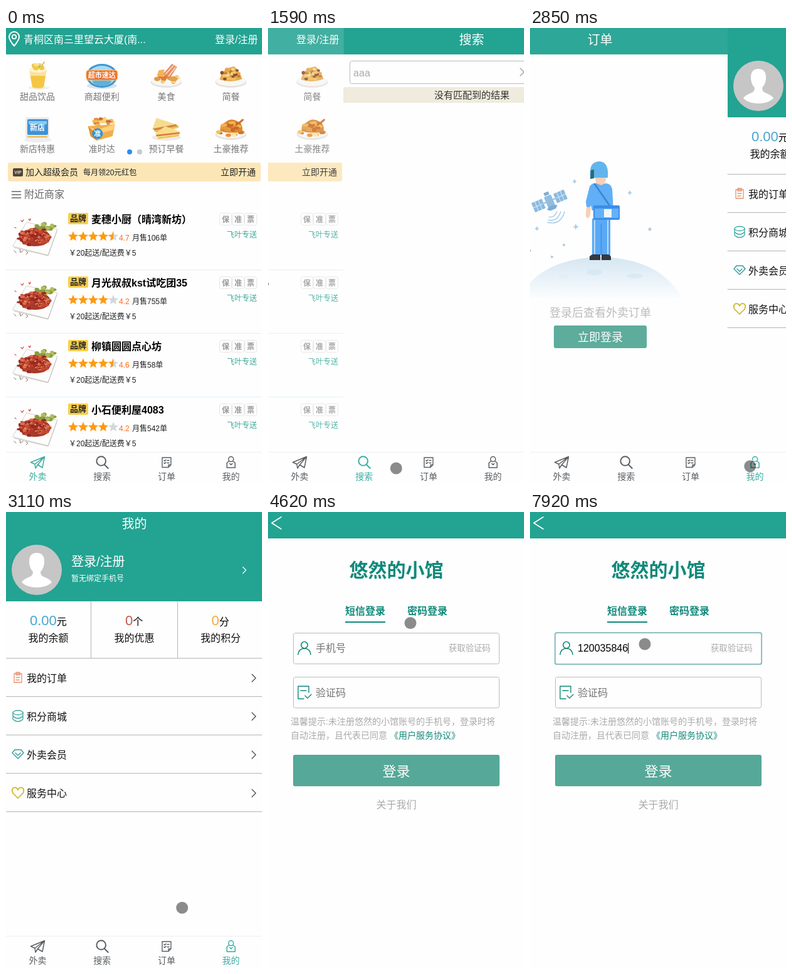
Animation of 408 by 725 pixels, one loop 8 s. Source, as an HTML page:

```html
<!DOCTYPE html>
<html lang="zh-CN">
<head>
<meta charset="utf-8">
<style>
html, body { margin: 0; width: 100%; height: 100%; overflow: hidden; background: #fefefe; }
svg { display: block; width: 408px; height: 725px; overflow: hidden; }
text { font-family: 'Liberation Sans', 'Noto Sans CJK SC', 'Noto Sans CJK', sans-serif; white-space: pre; }
.b { font-weight: bold; }
.m { text-anchor: middle; }
</style>
</head>
<body>
<svg id="stage" viewBox="0 0 408 725"></svg>
<script>
const W = 408, LOOP = 8000;
const TEAL = '#23a392', SOFT = '#56a898', DEEP = '#11897a', PAPER = '#fefefe';

// Shape helpers; text is placed by its vertical centre.
const text = (x, cy, size, str, fill, cls = '') =>
  `<text x="${x}" y="${cy + size * .38}" font-size="${size}" fill="${fill}" class="${cls}">${str}</text>`;
const rect = (x, y, w, h, fill, r = 0, more = '') =>
  `<rect x="${x}" y="${y}" width="${w}" height="${h}" fill="${fill}" rx="${r}" ${more}/>`;
const oval = (x, y, rx, ry, fill, more = '') =>
  `<ellipse cx="${x}" cy="${y}" rx="${rx}" ry="${ry}" fill="${fill}" ${more}/>`;
const path = (d, fill, stroke = 'none', w = 1) =>
  `<path d="${d}" fill="${fill}" stroke="${stroke}" stroke-width="${w}" stroke-linecap="round" stroke-linejoin="round"/>`;
const line = (d, stroke, w = 1) => path(d, 'none', stroke, w);
const frame = (x, y, w, h, stroke, r) => rect(x, y, w, h, 'none', r, `stroke="${stroke}"`);
const at = (x, y, body, more = '') => `<g transform="translate(${x} ${y}) ${more}">${body}</g>`;
const chevron = (x, y, color) => line(`M${x - 3} ${y - 6}l6 6-6 6`, color, 1.2);
const header = title => rect(0, 0, W, 42, TEAL) + text(204.5, 18, 20, title, '#fff', 'm');

// Seeded crumbs inside an ellipse.
function crumbs(n, cx, cy, rx, ry, size, colors, seed) {
  const rnd = () => (seed = (seed * 16807) % 2147483647) / 2147483647;
  let out = '';
  for (let i = 0; i < n; i++) {
    const a = rnd() * 6.283, r = Math.sqrt(rnd());
    out += oval((cx + Math.cos(a) * r * rx).toFixed(1), (cy + Math.sin(a) * r * ry).toFixed(1),
      size * (.7 + rnd() * .6), size * (.5 + rnd() * .4), colors[i % colors.length]);
  }
  return out;
}

const plate = oval(0, 10, 25, 9, '#e6e3df') + oval(0, 8, 24, 8, '#f8f7f4');
const foods = [
  oval(2, 19, 17, 3, '#f0efed') + path('M-13-10L15-10 10 19Q1 22-8 19z', '#fae3a0') +
    path('M-11 0L13 0 10 18Q1 21-8 18z', '#f5c645') + oval(1, -10, 14, 5, '#fff3cf') +
    crumbs(10, 2, -14, 10, 4, 4, ['#f6c945', '#fbe08a', '#eec24e', '#a9bd5c'], 9) + line('M6-14L11-22', '#e9b95c', 2),
  oval(0, 16, 24, 5, '#d9e2e8') + oval(0, 0, 25, 19, '#3f97d3') + oval(0, 0, 22, 16, '#a6dcf2') +
    oval(0, 8, 15, 8, '#5fb0df') +
    rect(-25, -9, 50, 16, '#f0702d', 4, 'stroke="#fbd083"') + text(0, -1, 11, '超市速达', '#fff', 'b m'),
  plate + crumbs(24, -1, 4, 19, 8, 4, ['#f3cc74', '#dc9a4a', '#f6e2a8', '#e0793f'], 4) +
    path('M-6-2L9-19 17-14 6 3z', '#e58c60') + line('M-1-3L11-16M4 0L14-13', '#fbe0cc', 1.8) +
    path('M-15 0L-12-9-3-10-5 2z', '#f3b455') + oval(11, 5, 7, 4, '#e5a04b'),
  plate + path('M-18 6Q-15-6-6-12L5-15Q14-8 18 5Q0 12-18 6z', '#e3ab54') +
    crumbs(30, 0, -2, 15, 9, 3.2, ['#e7a549', '#f6d78e', '#8f4f2b', '#f3c05c', '#c47a35'], 16),
  oval(1, 19, 22, 4, '#efeeec') + rect(-19, -17, 38, 34, '#e8ebec', 2) + rect(-16, -14, 33, 25, '#3c93d8', 2) +
    rect(-14, -11, 29, 5, '#8cc8f0') + text(0, -1, 12, '新店', '#fff', 'b m') + line('M-15 14h30', '#f0b24a', 2),
  path('M-22-3L21-6 17 13-8 20-18 13z', '#f2ae4a') + path('M-22-3L-9 3 -8 20-18 13z', '#dd9232') +
    crumbs(22, 0, -9, 18, 6, 3.8, ['#f6d27b', '#e58b3a', '#c9703a', '#f4b450'], 7) +
    path('M-22-3L-9 3 21-6 18 3-8 10z', '#ffd07a') + oval(-7, 9, 8.5, 8.5, '#2f93d9') + text(-7, 9, 11, '准', '#fff', 'b m'),
  oval(0, 15, 23, 5, '#eceae6') + path('M-22 1L-16-16 15-6 20 0-14 8z', '#f7dc8e') + path('M-22 1L15-6 20-2-14 8z', '#cf8744') +
    line('M-18 5L18-2', '#efc04f', 2.5) + path('M-18 9L-2-3 22 6 20 13-12 18z', '#f8dd8b') +
    line('M-15 12L20 8', '#d9773f', 2.5) + line('M-13 16L19 12', '#edbd57', 2),
  plate + crumbs(16, 0, 7, 20, 5, 3.6, ['#f4c25d', '#e7913a', '#fbe5af', '#c97830'], 21) +
    path('M-17 5Q-18-5-9-9Q0-17 10-11Q20-7 18 5Q2 10-17 5z', '#db852f') +
    crumbs(16, 0, -3, 14, 7, 4, ['#f1b250', '#c96a25', '#e59a3e'], 13) + line('M13-8L19-13', '#c9742a', 3)
];
const foodNames = ['甜品饮品', '商超便利', '美食', '简餐', '新店特惠', '准时达', '预订早餐', '土豪推荐'];

const dish = path('M33 26L82 37 67 78 11 64z', '#fdfdfc', '#cbc7c2', .8) + line('M13 66L67 79 81 40', '#c2beb8', 1) +
  crumbs(20, 62, 32, 18, 6, 3.4, ['#8a9c3b', '#b0bd5c', '#6a862f'], 5) +
  oval(46, 50, 25, 14, '#a8382a') +
  crumbs(60, 46, 49, 26, 14, 3.2, ['#c9492f', '#98291f', '#dd6f50', '#b53c2a'], 11) +
  crumbs(30, 46, 48, 23, 12, 1.3, ['#f0a080', '#7a2018', '#e8805c'], 31) +
  line('M24 23l2 2 2-3M36 21l2 2 1-3M14 34l2 1', '#d2503f', 1.3) + line('M13 71l3 3M22 69l1 5 4-3M32 72l3 2-3 3', '#8b6a62', 1);

function star(cx, from, to, fill) {
  const pts = [];
  for (let k = from; k <= to; k++) {
    const a = (k * 36 - 90) * Math.PI / 180, r = k % 2 ? 3.8 : 8.4;
    pts.push((cx + r * Math.cos(a)).toFixed(1) + ',' + (48.5 + r * Math.sin(a)).toFixed(1));
  }
  return `<polygon points="${pts.join(' ')}" fill="${fill}"/>`;
}

function shop([name, score, sold], i) {
  let s = dish + rect(99, 11, 32, 18, '#f9d04b', 2) + text(115, 19.5, 13, '品牌', '#222', 'b m') +
    text(136, 21, 16, name, '#000', 'b');
  for (let k = 0; k < 5; k++) {
    const cx = 107 + 16 * k;
    s += star(cx, 0, 9, k < 4 ? '#ff9a0d' : '#d3d7de');
    if (k == 4 && score > 4.5) s += star(cx, 5, 10, '#ff9a0d');
  }
  s += text(180, 50, 12, score, '#ff6a1a') + text(201, 50, 12, `月售${sold}单`, '#222') +
    text(100, 74, 12, '￥20起送/配送费￥5', '#222');
  [...'保准票'].forEach((c, k) => s += frame(340.5 + 20 * k, 11.5, 19, 19, '#e6e6e6', 3) + text(350 + 20 * k, 21, 12, c, '#999', 'b m'));
  return at(0, 283 + 101 * i, s + text(352, 45, 12, '飞叶专送', '#39a99b') + line('M0 101.5H408', '#e3eff6'));
}

function home() {
  let s = rect(0, 0, W, 42, TEAL) + line('M13 28.5Q5 19 5 14a8 8 0 0 1 16 0Q21 19 13 28.5z', '#fff', 2) +
    oval(13, 14, 3.2, 3.2, 'none', 'stroke="#fff" stroke-width="1.8"') +
    text(28, 17.5, 16, '青桐区南三里望云大厦(南...', '#fff') + text(333, 17.5, 16, '登录/注册', '#fff');
  foods.forEach((f, i) => {
    const x = 50 + 102.8 * (i % 4), y = i < 4 ? 76 : 159;
    s += at(x, y, f) + text(x, y + 33, 14, foodNames[i], '#777', 'm');
  });
  s += oval(197, 197, 4, 4, '#2b8ff0') + oval(213, 197, 4, 4, '#cacaca') +
    rect(3, 214, 403, 30, '#fde6b6', 3) + rect(11, 223, 16, 13, '#4a4540', 2) + text(19, 229, 7, 'VIP', '#f8dfa8', 'b m') +
    text(31, 229, 14, '加入超级会员', '#222') + text(123, 229, 12, '每月领20元红包', '#222') + text(342, 229, 14, '立即开通', '#222') +
    line('M9.5 260H23.5M9.5 265H23.5M9.5 270H23.5', '#666', 1.6) + text(29, 264, 16, '附近商家', '#666');
  const shops = [['麦穗小厨（晴湾新坊）', 4.7, 106], ['月光叔叔kst试吃团35', 4.2, 755], ['柳镇圆圆点心坊', 4.6, 58], ['小石便利屋4083', 4.2, 542]];
  return s + shops.map(shop).join('');
}

const search = () => header('搜索') + frame(10.5, 52.5, 295, 36, '#bbb', 3) + text(16, 71, 16, 'aaa', '#aaa') +
  line('M282 64l12 12m0-12l-12 12', '#aaa', 1.5) + rect(315, 53, 83, 35, TEAL, 3) + text(357, 71, 18, '提交', '#fff', 'm') +
  rect(0, 94, W, 25, '#efebdd') + text(205, 106.5, 15, '没有匹配到的结果', '#333', 'm');

function orders() {
  const panel = x => rect(x, -8, 18, 16, '#86b7df') + line(`M${x + 6}-8v16M${x + 12}-8v16M${x} 0h18`, '#deedf8');
  const sat = at(124, 275, panel(-28) + panel(10) + line('M-10 0H10', '#86b7df', 2) + rect(-6, -9, 12, 20, '#8bbbe0', 2) +
    rect(-4, -15, 8, 5, '#76a9d6') + path('M-9 11Q0 5 9 11L5 15H-5z', '#76a9d6'), 'rotate(-23)') +
    line('M123 300q8 3 13-8M122 305q14 4 20-13M121 309q21 5 27-17', '#9cc5e6', 1.3);
  const sparkles = [[164, 244, 3], [166, 316, 4], [104, 319, 3], [93, 354, 2], [147, 345, 2], [128, 364, 2], [252, 262, 3], [284, 320, 3]]
    .map(([x, y, r]) => path(`M${x} ${y - r}l1 ${r - 1} ${r - 1} 1-${r - 1} 1-1 ${r - 1}-1-${r - 1}-${r - 1}-1 ${r - 1}-1z`, '#a5cbe9', '#a5cbe9', .8)).join('');
  const courier = rect(192, 303, 29, 58, '#52a5f5') + line('M206.5 312V360', '#3a8cdc', 1.5) +
    line('M196 306V359M217 306V359', '#b5dcfb', 2) +
    path('M188 369v-6q4-4 9-3h8v9zM207 369v-9h9q5 0 6 4v5z', '#2c3038') +
    rect(198, 236, 14, 16, '#f6cfb2', 3) + path('M188 252Q192 246 199 247L206 250 213 247Q222 247 224 256L226 290H192L190 282 184 293 182 276z', '#5aacf7') +
    line('M196 248L221 284', '#2e7fcd', 2.5) + path('M183 284l7 2-1 10q-1 7-5 6-3-2-2-8z', '#f6cfb2') +
    path('M189 238Q186 212 204 212Q219 213 217 238H196z', '#5ab2ec') + path('M195 225l-5 1-1 14 6-1z', '#1e6470') +
    path('M196 238h18q1 9-8 10-8 0-10-10', '#f6cfb2') +
    rect(194, 282, 42, 23, '#3289e8', 2) + rect(196, 287, 38, 15, '#5eaef8') + rect(211, 288, 12, 13, '#eef7ff');
  return header('订单') + path('M74 430Q110 366 205 364Q300 366 336 430z', 'url(#ground)') +
    oval(195, 388, 12, 5, '#d5e8f4') + oval(147, 395, 9, 3, '#dfeef7') + oval(260, 394, 13, 4, '#d9eaf5') +
    sat + sparkles + courier + text(205, 452, 18, '登录后查看外卖订单', '#b9b9b9', 'm') +
    rect(131, 473, 148, 36, SOFT, 3) + text(205, 491, 18, '立即登录', '#fff', 'm');
}

function mine() {
  let s = header('我的') + rect(0, 42, W, 100, TEAL) + oval(49, 92, 40, 40, '#c6c6c6') +
    path('M49 65q13 0 12 16-1 9-6 14 0 6 5 8 11 4 13 9-9 8-24 8t-24-8q2-5 13-9 5-2 5-8-5-5-6-14-1-16 12-16z', '#fff') +
    text(104, 78, 20, '登录/注册', '#fff') + text(104, 105, 12, '暂无绑定手机号', '#fff') + line('M377.5 87.5l5 5-5 5', '#fff', 1.3);
  [['0.00', '元', '余额', '#4ba6cf', 38, 67.5], ['0', '个', '优惠', '#c45a4e', 190, 204.5], ['0', '分', '积分', '#f3a845', 327.5, 342]]
    .forEach(([n, unit, label, color, x, cx]) =>
      s += `<text x="${x}" y="180" font-size="22" fill="${color}">${n}<tspan font-size="16" fill="#000">${unit}</tspan></text>` +
        text(cx, 200, 16, '我的' + label, '#111', 'm'));
  s += line('M135.5 142V232M273.5 142V232', '#b5b5b5');
  const icons = [
    line('M-6-6h12v14h-12zM-3-8h6v4h-6zM-3 0h6M-3 4h5', '#e8926e', 1.3),
    oval(0, -5, 8, 3.5, 'none', 'stroke="#3aa9a0" stroke-width="1.3"') + line('M-8-5v10q3 4 8 4t8-4v-10M-8 0q3 4 8 4t8-4', '#3aa9a0', 1.3),
    line('M-5-7h10l4 5-9 9-9-9zM-4-2l4 4 4-4', '#2f9ea0', 1.4),
    line('M0 9L-8 1Q-11-5-7-7.500Q-2-9 0-4Q2-9 7-7.500Q11-5 8 1z', '#cfb526', 1.7)
  ];
  ['我的订单', '积分商城', '外卖会员', '服务中心'].forEach((label, i) => {
    const y = 264 + 61 * i;
    s += at(19, y - 1, icons[i]) + text(33, y, 16, label, '#111') + chevron(395, y, '#444');
  });
  for (let y = 232.5; y < 480; y += 61) s += line(`M0 ${y}H408`, '#b5b5b5');
  const touch = 'rgba(51,181,229,.4)';
  return s + `<g id="touch">${rect(0, 42, 89, 103, touch)}${rect(104, 42, 296, 76, touch)}${rect(360, 118, 40, 24, touch)}</g>`;
}

const login = () => rect(0, 0, W, 42, TEAL) + line('M21 8L6 17.5 21 27', '#fff', 1.7) +
  text(204.5, 92, 30, '悠然的小馆', DEEP, 'b m') + text(123, 157, 16, '短信登录', DEEP, 'b') + text(222, 157, 16, '密码登录', DEEP, 'b') +
  rect(123, 174, 64, 2, DEEP) + frame(40.5, 192.5, 328, 49, '#bbb', 3) +
  `<g id="focus">${rect(39.8, 191.8, 329.4, 50.4, 'none', 3, 'stroke="#8cbfc4" stroke-width="1.8"')}</g>` +
  oval(58, 211.5, 5.2, 5.2, 'none', `stroke="${DEEP}" stroke-width="1.6"`) + line('M48 226.500Q49 217 58 217T68 226.500', DEEP, 1.6) +
  text(76, 216, 16, '手机号', '#757575').replace('<text', '<text id="hint"') +
  '<text id="typed" x="76" y="222" font-size="16" fill="#000"></text>' + rect(0, 208, 1, 17, '#000', 0, 'id="caret"') +
  text(288, 216, 13.33, '获取验证码', '#aaa') + frame(40.5, 262.5, 328, 49, '#bbb', 3) +
  line('M65 287V277H48V297H57M52 284H61M59 292l4 4 6-6', DEEP, 1.4) + text(76, 287, 16, '验证码', '#757575') +
  text(36, 333, 14, '温馨提示:未注册悠然的小馆账号的手机号，登录时将', '#aaa') +
  text(36, 355, 14, '自动注册，且代表已同意', '#aaa') + text(194, 355, 14, '《用户服务协议》', DEEP) +
  rect(40, 386, 329, 50, SOFT, 3) + text(204.5, 412, 22, '登录', '#fff', 'm') + text(204.5, 465, 16, '关于我们', '#aaa', 'm');

function tabBar() {
  const ink = 'currentColor';
  const icons = [
    line('M-11 0L11-9 7.500 8.500 0 4-3.500 9.500-4.500 3zM-4.500 3L11-9M0 4L11-9', ink, 1.5),
    oval(-1.500, -2, 7.3, 7.3, 'none', `stroke="${ink}" stroke-width="2"`) + line('M4 4L9.500 9.500', ink, 2),
    line('M-7-7.500H7V4L3 8H-7zM7 4H3V8M-4-3l1 1 2-2M1-3h3M-4 1l1 1 2-2M1 1h3', ink, 1.4),
    oval(0, -5, 4, 4, 'none', `stroke="${ink}" stroke-width="1.5"`) + line('M-3-2L-6.500 1V8.500H6.500V1L3-2M-2 2L0 4 2 2', ink, 1.5)
  ];
  return rect(0, 674, W, 51, PAPER) + line('M0 674.5H408', '#f0f0f0') + ['外卖', '搜索', '订单', '我的'].map((label, i) => {
    const x = 50.5 + 102.7 * i;
    return `<g class="tab">${at(x, 690.5, icons[i])}${text(x, 713, 14, label, ink, 'm')}</g>`;
  }).join('');
}

const stage = document.getElementById('stage');
stage.innerHTML = '<linearGradient id="ground" x2="0" y2="1"><stop stop-color="#d3e6f2"/><stop offset="1" stop-color="#fcfdfe"/></linearGradient>' +
  [home, search, orders, mine, login].map(p => `<g class="page">${rect(0, 0, W, 725, PAPER)}${p()}</g>`).join('') +
  `<g id="bar">${tabBar()}</g><g id="cursor">${oval(0, 0, 10.3, 10.3, 'none', 'stroke="rgba(255,255,255,.5)" stroke-width="1.6"')}${oval(0, 0, 9.5, 9.5, 'rgba(0,0,0,.45)')}</g>`;

const $ = id => document.getElementById(id);
const pages = stage.querySelectorAll('.page'), tabs = stage.querySelectorAll('.tab');
const touch = $('touch'), focusBox = $('focus'), hint = $('hint'), typed = $('typed'), caret = $('caret'), bar = $('bar'), cursor = $('cursor');

// Each page change: [start of the slide, first moment it is seen].
const slides = [[1466, 1450], [2115, 2160], [2800, 2850], [4268, 4230]];
const keyTimes = [6420, 6560, 6690, 6870, 7110, 7300, 7480, 7650, 7920];
const digits = '120035846';
const trail = [
  [330, 240, 738], [770, 154.5, 695], [1450, 154.5, 695], [1590, 204, 700], [1780, 256, 700], [2150, 256, 700],
  [2210, 351, 697], [2850, 351, 697], [3110, 281, 630], [3620, 115, 227], [3730, 137, 175], [3870, 137, 175],
  [4150, 198, 123], [4340, 198, 123], [4660, 231, 184], [4730, 231, 184], [4990, 177, 207], [5120, 183, 210]
];

// cubic-bezier(.25, .1, .25, 1)
function ease(x) {
  if (x <= 0) return 0;
  if (x >= 1) return 1;
  let lo = 0, hi = 1;
  for (let i = 0; i < 20; i++) {
    const u = (lo + hi) / 2;
    if (.75 * u * (1 - u) + u * u * u < x) lo = u; else hi = u;
  }
  return .3 * lo * (1 - lo) ** 2 + 3 * lo * lo * (1 - lo) + lo ** 3;
}

function cursorAt(t) {
  const i = trail.findIndex(k => k[0] > t);
  if (i < 1) return trail.at(i).slice(1);
  const [t0, x0, y0] = trail[i - 1], [t1, x1, y1] = trail[i], f = (t - t0) / (t1 - t0);
  return [x0 + (x1 - x0) * f, y0 + (y1 - y0) * f];
}

const move = (el, x, y) => el.setAttribute('transform', `translate(${x.toFixed(2)} ${y.toFixed(2)})`);
const show = (el, on) => el.setAttribute('visibility', on ? 'visible' : 'hidden');

function draw() {
  const t = performance.now() % LOOP;
  const done = slides.map(([start, seen]) => t < seen ? 0 : ease((t - start) / 300));
  pages.forEach((page, i) => {
    const enter = i ? done[i - 1] : 1, leave = done[i] || 0;
    move(page, W * (1 - enter - leave), 0);
    page.setAttribute('opacity', 1 - .2 * leave);
    page.setAttribute('display', enter > 0 && leave < 1 ? 'inline' : 'none');
  });
  const active = slides.slice(0, 3).filter(s => t >= s[1]).length;
  tabs.forEach((tab, i) => tab.style.color = i == active ? '#3aada3' : '#5a5f63');
  move(bar, 0, 51 * done[3]);

  show(touch, t >= 4230 && t < 4400);
  const count = keyTimes.filter(k => t >= k).length;
  typed.textContent = digits.slice(0, count);
  show(focusBox, t >= 5490);
  show(hint, !count);
  show(caret, t >= 5490 && t < 6010 || count);
  caret.setAttribute('x', 76 + Math.round(count * 8.9));
  move(cursor, ...cursorAt(t));
  requestAnimationFrame(draw);
}
draw();
</script>
</body>
</html>
```
